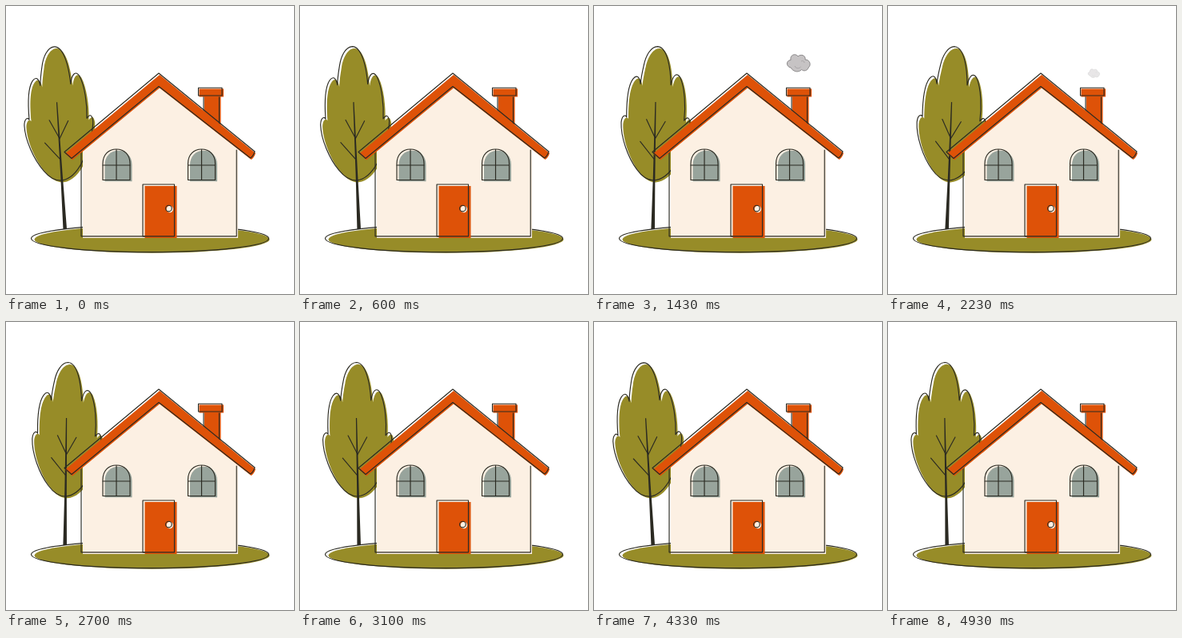
Write an HTML page that moves like this. It is 360 px wide and 360 px high and loops after 5000 ms.

```html
<!DOCTYPE html>
<html lang="en">
<head>
<meta charset="utf-8">
<title>House with tree</title>
<style>
  html, body { margin: 0; width: 100%; height: 100%; overflow: hidden; background: #fff; }
  svg { display: block; width: 100%; height: 100%; }
  .line { fill: none; stroke: #2b2a22; stroke-width: 1.15; stroke-linejoin: round; stroke-linecap: round; }
  .olive { fill: #978c28; }
  .orange { fill: #de5208; }
  .cream { fill: #fcf0e3; }
  .glass { fill: #98a49c; }
  .ink { fill: #2b2a22; }
</style>
</head>
<body>
<svg viewBox="0 0 360 360">
  <defs>
    <path id="leaf" d="M71.500 50.500C62.500 51 57 63 55 74C53 84 52 91 51.500 98C50 88 46 86.500 42 92C37 99 34.500 113 35.500 140C34 136.500 29.500 138 29 147C29 165 38.500 190 50.500 205C57 213.500 64 218 72 218C83 217 92 208 99 196C109 178 115 155 115 145C114 137 111 137 107.500 142C109 125 107 101 101 88.500C97 82 92 84 89.500 98C88.500 78 84 51 71.500 50.500Z"/>
    <path id="roof" d="M192 86L312 184Q310 190 306.500 192L192 102.500L83 192.500L74 184.500Z"/>
    <path id="pane" d="M121 217.500V197C121 186 128 179 138 179S155 186 155 197V217.500Z"/>
    <g id="window">
      <use href="#pane" class="glass" x="2.500" y="1.800"/>
      <use href="#pane" class="line"/>
      <path class="line" d="M138 179.500V217M121 199H155"/>
    </g>
  </defs>

  <ellipse class="olive" cx="182.500" cy="291.700" rx="147" ry="17"/>
  <ellipse class="line" cx="180" cy="290.600" rx="148.500" ry="17"/>

  <g id="tree">
    <use href="#leaf" class="olive" x="2.400" y="2.300"/>
    <use href="#leaf" class="line"/>
    <path class="ink" d="M70.500 120L71.700 120L73.500 210L75.300 279H70.700L71 210Z"/>
    <path class="line" d="M84 144L72 166M60.500 142L72 165M53.500 170L72 192"/>
  </g>

  <g>
    <path class="orange" d="M248 112H268.500V160H248Z"/>
    <path class="line" d="M247 112V150M266.500 112V150"/>
    <rect class="orange" x="241.500" y="103.500" width="30.500" height="10"/>
    <rect class="line" x="240.500" y="102.200" width="29.500" height="9.800"/>
  </g>

  <path class="cream" d="M96 290V180L192 98L290 180V290Z"/>
  <path class="line" d="M94 180V287.800H288.200V180"/>
  <use href="#roof" class="orange"/>
  <use href="#roof" class="line" x="-1" y="-2"/>

  <use href="#window"/>
  <use href="#window" x="106.500"/>

  <rect class="orange" x="173.500" y="225" width="40" height="65"/>
  <rect class="line" x="171" y="223" width="39.500" height="64.800"/>
  <circle class="cream" cx="204.800" cy="254" r="4.200"/>
  <circle class="line" cx="203.400" cy="253" r="3.800"/>

  <g id="puff">
    <path d="M246 77C240 76 239.500 68 246 67.500C244.500 61 252 58.500 255 63C259 59.500 265 62 264 67C270 67 272 74 268 77C267 81 262 82 259.500 79.500C256 83.500 249 82.500 246 77Z"
      fill="#c6c3c4" stroke="#827f80" stroke-width=".9" stroke-linejoin="round"/>
    <path d="M251 75C252 78 256 79 258.500 76M259 69C261 68 263 69 263 71" fill="none" stroke="#a5a2a4" stroke-width=".9"/>
  </g>
</svg>
<script>
  const tree = document.getElementById('tree');
  const puff = document.getElementById('puff');
  const LOOP = 5000, SWAY = 4000;
  // Puff size over time: [ms, scale]
  const sizes = [[1030, 0], [1430, 1], [1740, 1.6], [2230, .5], [2450, 0]];

  function sizeAt(t) {
    for (let i = 1; i < sizes.length; i++) {
      const [t0, s0] = sizes[i - 1], [t1, s1] = sizes[i];
      if (t >= t0 && t < t1) return s0 + (s1 - s0) * (t - t0) / (t1 - t0);
    }
    return 0;
  }

  function draw(now) {
    // Two uneven steps in every tenth of a second
    const ms = now % LOOP, part = ms % 100;
    const t = ms - part + (part >= 30 ? 30 : 0);

    const angle = -3 * Math.cos(2 * Math.PI * t / SWAY);
    tree.setAttribute('transform', `translate(.7 0) rotate(${angle} 73 278)`);

    const s = sizeAt(t);
    puff.setAttribute('transform', `translate(259 97) scale(${s}) translate(-259 -97)`);
    puff.setAttribute('opacity', Math.max(0, Math.min(1, s * 1.2 - .2)));
  }

  function tick() {
    draw(performance.now());
    requestAnimationFrame(tick);
  }
  tick();
</script>
</body>
</html>
```
